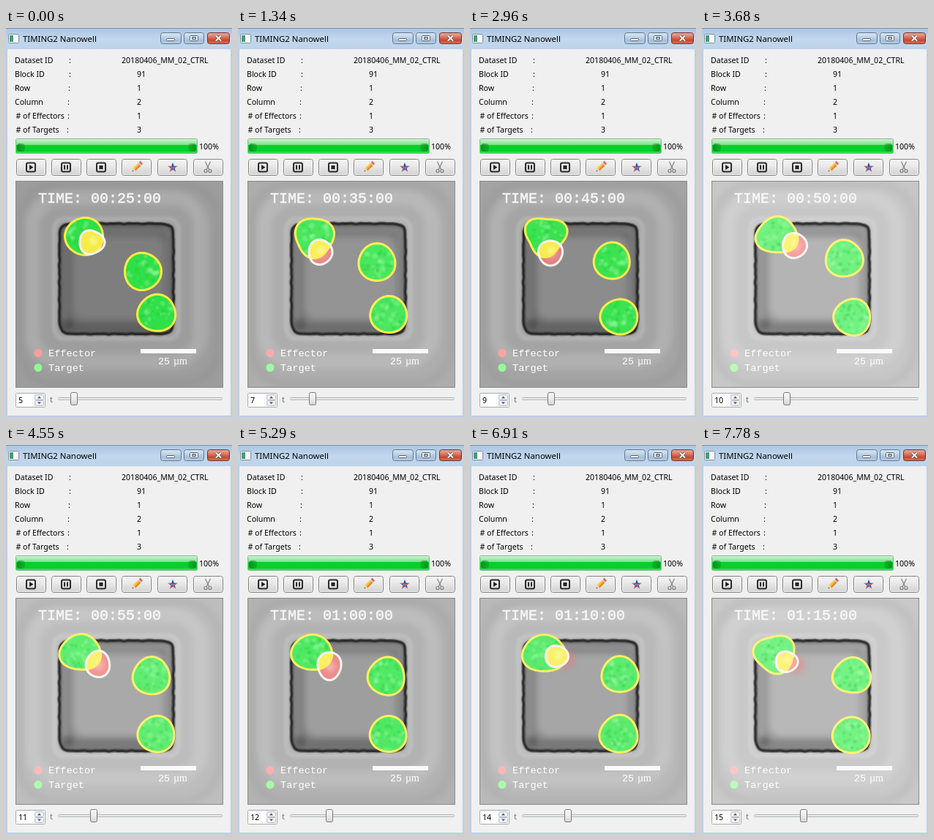
Animation, 309 px wide and 532 px high, one loop 8 s. Source, as an HTML page with a canvas:

```html
<!DOCTYPE html>
<html lang="en">
<head>
<meta charset="utf-8">
<title>Nanowell player</title>
<style>
html, body { margin: 0; width: 100%; height: 100%; overflow: hidden; background: #f0f0f0; }
canvas { display: block; width: 309px; height: 532px; }
</style>
</head>
<body>
<canvas id="stage"></canvas>
<script>
const W = 309, H = 532, LOOP = 8000, FIRST = 5;
const SWITCHES = [440, 1340, 2090, 2960, 3680, 4550, 5290, 6190, 6910, 7780];
const UI = '"Noto Sans", "Open Sans", sans-serif';
const MONO = '"Liberation Mono", "Courier New", monospace';

// Blobs are [x, y, rx, ry, corner size, corner angle].
const KEYS = [
  { t: 5, bg: 157, wall: 106, floor: 126, glow: 0,
    a: [107, 285, 26, 25.5, 0.5, 60], b: [187, 333, 25, 25.5, 0.5, 0], c: [206, 390, 26, 25, 0.8, 40], e: [117, 293, 17, 16, 1, 0] },
  { t: 7, bg: 173, wall: 122, floor: 148, glow: 0,
    a: [104.5, 286, 26, 27, 2, 95], b: [190, 320.5, 25, 25.5, 0.5, 30], c: [206, 392, 25, 25, 0.5, 40], e: [112.5, 306.5, 16, 17, 0.5, 0] },
  { t: 9, bg: 164, wall: 110, floor: 140, glow: 0,
    a: [103.5, 284, 27.5, 26, 3.5, 95], b: [194, 318.5, 24.5, 25, 0.5, 40], c: [204, 395, 25.5, 24, 0.6, 60], e: [110, 307.5, 16.5, 17, 0.5, 90] },
  { t: 10, bg: 199, wall: 144, floor: 180, glow: 0,
    a: [102.5, 284, 28.5, 24.5, 1.8, 35], b: [194.5, 315.5, 25.5, 25, 0.8, 20], c: [205.5, 395.5, 25, 25, 0.8, 60], e: [126.5, 297.5, 16.5, 17, 0.5, 0] },
  { t: 12, bg: 178, wall: 126, floor: 158, glow: 0,
    a: [101, 284, 28, 24, 0.8, 40], b: [203, 316.5, 25, 26, 1, 50], c: [205.5, 395.5, 25, 24.5, 0.6, 40], e: [125, 302, 16, 19, 0.6, 90] },
  { t: 14, bg: 185, wall: 134, floor: 166, glow: 1,
    a: [101.5, 285.5, 30, 25, 1.2, 30], b: [205, 314, 25, 24.5, 0.8, 30], c: [203.5, 395.5, 26, 25.5, 1, 40], e: [118.5, 289, 15.5, 14.5, 0.5, 0] },
  { t: 15, bg: 201, wall: 152, floor: 184, glow: 1,
    a: [99.5, 285.5, 27.5, 25.5, 2.5, 75], b: [205, 315.5, 26, 24, 1.2, 40], c: [204, 397, 25.5, 24.5, 0.6, 40], e: [115.5, 296.5, 15, 14, 0.6, 0] }
];

const canvas = document.getElementById('stage');
const ctx = canvas.getContext('2d');
const dpr = window.devicePixelRatio || 1;
canvas.width = Math.round(W * dpr);
canvas.height = Math.round(H * dpr);

const mix = (p, q, k) => Array.isArray(p) ? p.map((v, i) => mix(v, q[i], k)) : p + (q - p) * k;
const rgb = c => `rgb(${c.map(Math.round)})`;
const gray = (v, alpha = 1) => `rgba(${v},${v},${v},${alpha})`;

function stateAt(t) {
  const i = Math.max(1, KEYS.findIndex(key => key.t >= t));
  const p = KEYS[i - 1], q = KEYS[i], k = (t - p.t) / (q.t - p.t);
  const state = {};
  for (const name in p) state[name] = mix(p[name], q[name], k);
  state.light = (state.bg - 157) / 44;
  state.rim = rgb(mix([255, 236, 68], [255, 243, 120], state.light));
  return state;
}

function random(seed) {
  return () => {
    seed = (seed * 16807) % 2147483647;
    return seed / 2147483647;
  };
}

function rect(x, y, w, h, color) {
  ctx.fillStyle = color;
  ctx.fillRect(x, y, w, h);
}

function disc(x, y, r, color) {
  ctx.fillStyle = color;
  ctx.beginPath();
  ctx.arc(x, y, r, 0, Math.PI * 2);
  ctx.fill();
}

function text(str, x, y, font, color = '#000') {
  ctx.font = font;
  ctx.fillStyle = color;
  ctx.fillText(str, x, y);
}

function fall(y, h, ...stops) {
  const g = ctx.createLinearGradient(0, y, 0, y + h);
  stops.forEach((c, i) => g.addColorStop(i / (stops.length - 1), c));
  return g;
}

function box(x, y, w, h, r, fill, border) {
  ctx.beginPath();
  ctx.roundRect(x + 0.5, y + 0.5, w - 1, h - 1, r);
  ctx.fillStyle = fill;
  ctx.fill();
  ctx.strokeStyle = border;
  ctx.lineWidth = 1;
  ctx.stroke();
}

function poly(points, fill) {
  ctx.beginPath();
  points.forEach(([x, y]) => ctx.lineTo(x, y));
  ctx.closePath();
  ctx.fillStyle = fill;
  ctx.fill();
}

function line(x1, y1, x2, y2, color, width) {
  ctx.beginPath();
  ctx.moveTo(x1, y1);
  ctx.lineTo(x2, y2);
  ctx.strokeStyle = color;
  ctx.lineWidth = width;
  ctx.stroke();
}

function drawTitleBar() {
  rect(0, 0, W, H, '#b9d1ea');
  rect(0, 0, W, 30, fall(0, 30, '#a9c5e2', '#c2d7ed', '#bdd3ea'));
  rect(2, 29, W - 4, 501, '#f0f0f0');
  rect(0, 0, W, 1, '#7f93a8');
  box(3, 8, 15, 13, 1, '#fff', '#7c8a99');
  rect(5, 10, 5, 9, '#4a9a78');
  text('TIMING2 Nanowell', 23, 19, `11.4px ${UI}`);

  const blue = fall(6, 17, '#dbe7f4', '#c4d6e9', '#a5bfdb', '#c0d6ec');
  box(211, 6, 29, 16, 3, blue, '#62788f');
  box(243, 6, 28, 16, 3, blue, '#62788f');
  box(275, 6, 31, 16, 3, fall(6, 16, '#e9b0a2', '#d98370', '#c4492f', '#dc7a5a'), '#6b3630');
  box(219, 14, 12, 4, 1, '#fff', '#53606e');
  box(251, 10, 12, 8, 1, '#fff', '#53606e');
  box(254, 12, 6, 4, 0, '#a9c1da', '#53606e');
  for (const [color, width] of [['#6b3c36', 3.4], ['#fff', 2]]) {
    line(287, 10.5, 294, 17.5, color, width);
    line(294, 10.5, 287, 17.5, color, width);
  }
}

function drawInfo() {
  const rows = [
    ['Dataset ID', 86, '20180406_MM_02_CTRL', 158],
    ['Block ID', 86, '91', 179],
    ['Row', 85, '1', 179],
    ['Column', 84, '2', 179],
    ['# of Effectors', 84, '1', 179],
    ['# of Targets', 83, '3', 179]
  ];
  rows.forEach(([label, colon, value, x], i) => {
    const y = 48 + i * 19;
    const font = `10.6px ${UI}`;
    text(label, label[0] === '#' ? 13.5 : 12, y, font);
    text(':', colon, y, font);
    text(value, x, y, font);
  });
}

function drawProgress() {
  box(13, 151, 249, 21, 2, '#06d02b', '#8fb396');
  rect(14, 152, 247, 8, fall(152, 8, '#cdf3d2', '#a3ebad', '#74e183'));
  rect(14, 169, 247, 2, '#2fdc4c');
  for (const [x, from, to] of [[15, 1, 0], [249, 0, 1]]) {
    const g = ctx.createLinearGradient(x, 0, x + 12, 0);
    g.addColorStop(0, `rgba(0,120,20,${0.25 + from * 0.45})`);
    g.addColorStop(1, `rgba(0,120,20,${0.25 + to * 0.45})`);
    ctx.beginPath();
    ctx.roundRect(x, 158, 11, 11, 4);
    ctx.fillStyle = g;
    ctx.fill();
  }
  text('100%', 264, 166, `10.6px ${UI}`);
}

function mediaFrame(x) {
  ctx.beginPath();
  ctx.roundRect(x - 6, 184.5, 12, 12, 2);
  ctx.strokeStyle = '#2b2b2b';
  ctx.lineWidth = 2;
  ctx.stroke();
}

function drawPencil() {
  ctx.save();
  ctx.translate(179, 190);
  ctx.rotate(-Math.PI / 4);
  rect(-5, -2.5, 10, 5, '#f6a52c');
  rect(-5, -2.5, 10, 1.6, '#ffcb62');
  rect(-5, 1.2, 10, 1.3, '#d87d18');
  rect(5, -2.5, 1.5, 5, '#c8ccd2');
  rect(6.5, -2.5, 2.5, 5, '#e0606a');
  poly([[-5, -2.5], [-9, 0], [-5, 2.5]], '#f2d5a8');
  poly([[-7.3, -1], [-9, 0], [-7.3, 1]], '#333');
  ctx.restore();
}

// Each arm of the star has a blue and a red facet.
function drawStar() {
  const point = i => {
    const r = i % 2 ? 2.8 : 7.2, a = i * Math.PI / 5 - Math.PI / 2;
    return [228 + r * Math.cos(a), 191 + r * Math.sin(a)];
  };
  for (let i = 0; i < 10; i++) {
    poly([[228, 191], point(i), point(i + 1)], i % 2 || i === 0 ? '#2b4fa8' : '#d64a44');
  }
}

function drawScissors() {
  line(272.5, 183, 278, 194, '#8c8c8c', 1.4);
  line(279.5, 183, 274, 194, '#8c8c8c', 1.4);
  ctx.strokeStyle = '#808080';
  ctx.lineWidth = 1.2;
  for (const x of [273, 279]) {
    ctx.beginPath();
    ctx.arc(x, 195.5, 2, 0, Math.PI * 2);
    ctx.stroke();
  }
}

function drawButtons() {
  for (const x of [14, 62, 110, 158, 207, 256]) {
    box(x, 179, 41, 23, 3, fall(179, 23, '#f4f4f4', '#ededed', '#dedede', '#d2d2d2'), '#808080');
    box(x + 1, 180, 39, 21, 2, 'transparent', 'rgba(255,255,255,0.7)');
  }
  for (const x of [34, 82, 130]) mediaFrame(x);
  poly([[32, 187], [37.5, 190.5], [32, 194]], '#222');
  rect(79, 187.5, 2, 6, '#222');
  rect(83, 187.5, 2, 6, '#222');
  rect(127.5, 188, 5, 5, '#222');
  drawPencil();
  drawStar();
  drawScissors();
}

function softBox(x, y, w, h, r, color, blur, stroke) {
  ctx.save();
  ctx.filter = `blur(${blur * dpr}px)`;
  ctx.beginPath();
  ctx.roundRect(x, y, w, h, r);
  if (stroke) {
    ctx.strokeStyle = color;
    ctx.lineWidth = stroke;
    ctx.stroke();
  } else {
    ctx.fillStyle = color;
    ctx.fill();
  }
  ctx.restore();
}

// Rounded square with a slightly uneven edge.
function wellPath() {
  ctx.beginPath();
  for (let i = 0; i < 240; i++) {
    const a = i / 240 * Math.PI * 2, c = Math.cos(a), s = Math.sin(a);
    const r = Math.pow(Math.abs(c) ** 13 + Math.abs(s) ** 13, -1 / 13);
    const wob = 0.3 * Math.sin(a * 23) + 0.25 * Math.sin(a * 41 + 1);
    ctx.lineTo(151 + c * (r * 78 + wob), 343 + s * (r * 75.5 + wob));
  }
  ctx.closePath();
}

function drawWell(s) {
  softBox(36, 232, 230, 224, 40, gray(255, 0.15), 5, 20);
  softBox(18, 214, 273, 273, 50, gray(70, 0.08), 5, 8);
  softBox(66, 261, 170, 164, 14, gray(255, 0.2), 2, 5);

  ctx.save();
  wellPath();
  ctx.fillStyle = gray(s.wall);
  ctx.fill();
  ctx.clip();
  softBox(91, 285, 126, 114, 16, gray(s.floor), 5);
  softBox(79, 275, 144, 137, 8, gray(s.floor + 10, 0.4), 3, 5);
  softBox(71, 266, 160, 154, 8, gray(25, 0.5), 3, 6);
  softBox(78, 405, 146, 10, 4, gray(30, 0.2), 3);
  softBox(76, 398, 16, 14, 5, gray(25, 0.25), 3);
  ctx.restore();

  ctx.save();
  ctx.filter = `blur(${0.6 * dpr}px)`;
  ctx.lineJoin = 'round';
  wellPath();
  ctx.strokeStyle = gray(45, 0.4);
  ctx.lineWidth = 5.5;
  ctx.stroke();
  ctx.strokeStyle = gray(Math.round(s.bg * 0.25));
  ctx.lineWidth = 2.8;
  ctx.stroke();
  ctx.restore();
}

function blobPath([x, y, rx, ry, k, angle]) {
  ctx.beginPath();
  for (let i = 0; i < 60; i++) {
    const a = i / 60 * Math.PI * 2;
    const d = k * Math.cos(3 * (a - angle * Math.PI / 180));
    ctx.lineTo(x + (rx + d) * Math.cos(a), y + (ry + d) * Math.sin(a));
  }
  ctx.closePath();
}

function outline(blob, color) {
  blobPath(blob);
  ctx.strokeStyle = color;
  ctx.lineWidth = 3;
  ctx.stroke();
}

function drawTarget(blob, s, seed) {
  const rnd = random(seed);
  const [x, y, rx, ry] = blob;
  ctx.save();
  blobPath(blob);
  ctx.fillStyle = rgb(mix([48, 224, 72], [116, 242, 130], s.light));
  ctx.fill();
  ctx.clip();
  ctx.filter = `blur(${0.8 * dpr}px)`;
  for (let i = 0; i < 40; i++) {
    const a = rnd() * Math.PI * 2, d = Math.sqrt(rnd()) * 0.88, dark = i % 2;
    const color = dark ? 'rgba(20,185,55,0.35)' : 'rgba(185,255,190,0.3)';
    disc(x + rx * d * Math.cos(a), y + ry * d * Math.sin(a), 1 + rnd() * (dark ? 1.4 : 3), color);
  }
  ctx.restore();
  outline(blob, s.rim);
}

function drawEffector(s) {
  const [x, y] = s.e;
  if (s.glow) {
    ctx.save();
    ctx.filter = `blur(${4 * dpr}px)`;
    disc(x + 13, y + 4, 12, `rgba(255,110,110,${0.4 * s.glow})`);
    ctx.restore();
  }
  ctx.save();
  blobPath(s.e);
  ctx.fillStyle = rgb(mix([224, 122, 122], [250, 160, 160], s.light));
  ctx.fill();
  ctx.clip();
  ctx.save();
  ctx.filter = `blur(${3 * dpr}px)`;
  disc(x + 1, y + 1, 7, 'rgba(255,220,212,0.5)');
  ctx.restore();
  blobPath(s.a);
  ctx.fillStyle = rgb(mix([244, 236, 72], [252, 243, 125], s.light));
  ctx.fill();
  ctx.save();
  ctx.clip();
  ctx.filter = `blur(${2 * dpr}px)`;
  disc(x + 2, y - 2, 6, 'rgba(255,250,165,0.6)');
  ctx.restore();
  outline(s.a, s.rim);
  ctx.restore();
  outline(s.e, '#fff6f2');
}

function drawOverlay(t, s) {
  const pad = n => String(n).padStart(2, '0');
  const tint = Math.round(s.light * 42);
  const clock = `TIME: ${pad(Math.floor(t / 12))}:${pad(t * 5 % 60)}:00`;
  text(clock, 44, 239, `20px ${MONO}`, '#f8f8f8');
  ctx.strokeStyle = '#f8f8f8';
  ctx.lineWidth = 0.5;
  ctx.strokeText(clock, 44, 239);
  disc(44, 444.5, 5.5, rgb([255, 155 + tint, 155 + tint]));
  disc(44, 464.5, 5.5, rgb([142 + tint, 255, 142 + tint]));
  text('Effector', 58, 449, `13.6px ${MONO}`, '#fff');
  text('Target', 58, 469, `13.6px ${MONO}`, '#fff');
  rect(184, 439, 76, 6, '#fafafa');
  text('25', 208, 460, `13.4px ${MONO}`, '#fff');
  text('µm', 229, 460, '14px "Liberation Serif", serif', '#fff');
}

function drawSlider(t) {
  box(13, 499, 41, 20, 1, '#fff', '#a6aab0');
  text(t, 17, 513, `10.6px ${UI}`);
  for (const y of [501, 509]) box(39, y, 13, 8, 1, '#f0f0f0', '#b8bcc2');
  poly([[43, 506.5], [45.5, 503.5], [48, 506.5]], '#40618f');
  poly([[43, 511.5], [45.5, 514.5], [48, 511.5]], '#40618f');
  text('t', 60, 512, `11px ${UI}`, '#777');

  box(71, 505, 225, 4, 1, '#e7eaea', '#b3b6b6');
  const x = 88 + Math.round((t - FIRST) * 4.55);
  box(x, 498, 10, 18, 2, fall(498, 18, '#f7f7f7', '#ececec', '#d2d2d2'), '#777');
}

function draw(t) {
  const s = stateAt(t);
  ctx.setTransform(dpr, 0, 0, dpr, 0, 0);
  ctx.clearRect(0, 0, W, H);
  drawTitleBar();
  drawInfo();
  drawProgress();
  drawButtons();

  rect(13, 209, 284, 283, '#8a8a8a');
  ctx.save();
  ctx.beginPath();
  ctx.rect(14, 210, 282, 281);
  ctx.clip();
  rect(14, 210, 282, 281, gray(s.bg));
  drawWell(s);
  drawTarget(s.a, s, t * 31 + 7);
  drawTarget(s.b, s, t * 57 + 11);
  drawTarget(s.c, s, t * 83 + 5);
  drawEffector(s);
  drawOverlay(t, s);
  ctx.restore();
  drawSlider(t);
}

let shown = -1;
const start = performance.now();

function tick() {
  const time = (performance.now() - start) % LOOP;
  const t = FIRST + SWITCHES.filter(at => time >= at).length;
  if (t !== shown) draw(shown = t);
  requestAnimationFrame(tick);
}
tick();
</script>
</body>
</html>
```
